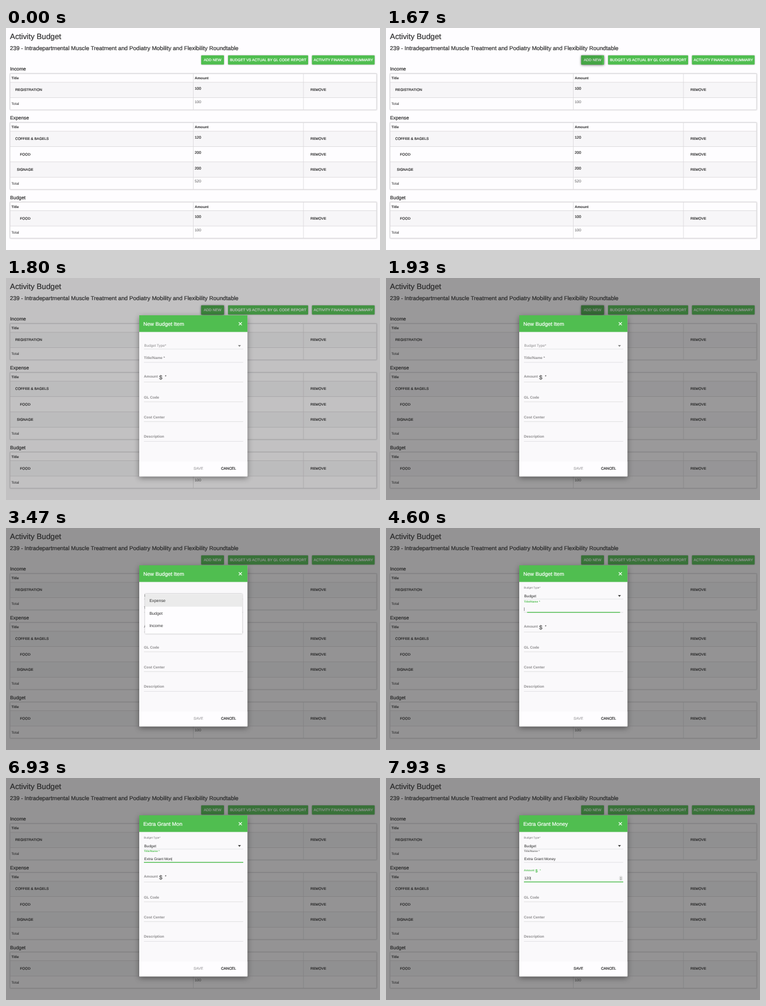
An HTML page that plays this animation: 640x381 px, repeating every 8000 ms.

```html
<!DOCTYPE html>
<html lang="en">
<head>
<meta charset="utf-8">
<title>Activity Budget</title>
<style>
  html, body { margin: 0; width: 100%; height: 100%; overflow: hidden; background: #fefdff; }
  svg { display: block; width: 640px; height: 381px; }
  text { font-family: "Liberation Sans", Arial, sans-serif; text-rendering: geometricPrecision; white-space: pre; }
  .bold { font-weight: bold; }
  .medium { stroke: currentColor; stroke-width: .2px; }
  .raised { filter: drop-shadow(0 .8px .8px rgba(0, 0, 0, .35)); }
  .pressed { filter: drop-shadow(0 1.5px 2px rgba(0, 0, 0, .45)); }
  .floating { filter: drop-shadow(0 3px 5px rgba(0, 0, 0, .4)); }
</style>
</head>
<body>
<svg viewBox="0 0 640 381"><g id="page"></g><g id="overlay"></g></svg>
<script>
const LOOP = 8000, GREEN = '#50be50', INK = '#2b2b2b', GREY = '#8c8b8d', LINE = '#d9d8da';
const TITLE = 'Extra Grant Money';

// Timeline in ms
const PRESS = 1600, OPEN = 1727, MENU_OPEN = 3130, HOVER = 3600, PICK = 3650,
  TITLE_FOCUS = 4400, TYPE_START = 5330, TYPE_STEP = 110, AMOUNT_FOCUS = 7300, DIGIT_START = 7600, DIGIT_STEP = 130;

const clamp = v => Math.min(1, Math.max(0, v));
const progress = (t, start, length) => clamp((t - start) / length);

// cubic-bezier(.25, .8, .25, 1)
function swift(x) {
  let lo = 0, hi = 1, u = .5;
  for (let i = 0; i < 20; i++) {
    u = (lo + hi) / 2;
    if (.75 * u * (1 - u) + u ** 3 < x) lo = u; else hi = u;
  }
  return 2.4 * u * (1 - u) ** 2 + 3 * u * u * (1 - u) + u ** 3;
}

const rect = (x, y, w, h, fill, extra = '') =>
  `<rect x="${x}" y="${y}" width="${w}" height="${h}" fill="${fill}" ${extra}/>`;
const text = (x, y, size, str, fill = INK, cls = 'medium', extra = '') =>
  `<text x="${x}" y="${y}" font-size="${size}" fill="${fill}" color="${fill}" class="${cls}" ${extra}>${str.replace('&', '&amp;')}</text>`;
const button = (x, w, label, cls = 'raised') =>
  rect(x, 47, w, 15.8, GREEN, `rx="1" class="${cls}"`) +
  text(x + w / 2, 57.2, 6.33, label, '#fff', 'medium', 'text-anchor="middle"');

function table(name, top, rows, total) {
  const head = 14.6, rowH = 26.35, totalH = 20.8;
  const height = head + rows.length * rowH + totalH;
  let y = top + head;
  let out = text(7, top - 5.4, 8.3, name) +
    rect(7, top, 627.3, height, '#fefdff', 'class="raised"') +
    text(9.3, top + 9.5, 6.25, 'Title', INK, 'bold') + text(323, top + 9.5, 6.25, 'Amount', INK, 'bold');
  rows.forEach(([label, x, amount], i) => {
    out += rect(7, y, 627, rowH, i % 2 ? '#fefdff' : '#f7f6f8') + rect(7, y - .4, 627, .8, LINE) +
      text(x, y + 15.3, 6.2, label) + text(323, y + 12.8, 6.5, amount) + text(521, y + 15.3, 6.2, 'REMOVE');
    y += rowH;
  });
  return out + rect(7, y - .4, 627, .8, LINE) +
    text(9.3, y + 12.7, 6.15, 'Total', INK, '') + text(323, y + 9.3, 6.5, total, '#555', '') +
    rect(320, top, .8, height, LINE) + rect(508.6, top, .8, height, LINE) +
    rect(7, top, 627, height, 'none', `stroke="${LINE}" stroke-width=".8"`);
}

function label(x, y, str, floated, active, cls = 'bold', icon = '') {
  const scale = 1 - .25 * floated;
  const color = active ? GREEN : floated > .5 ? '#777' : GREY;
  return `<g transform="translate(${x} ${y}) scale(${scale})">${text(0, 0, 6.3, str, color, cls)}${
    icon ? text(26, 2.2, 10, icon, active ? GREEN : '#555', 'medium') + text(36, 0, 6.3, '*', active ? GREEN : '#555', 'bold') : ''}</g>`;
}

function underline(y, focus = 0) {
  const w = 170 * focus;
  return rect(236, y - .4, 170, .8, '#dddcde') + (focus ? rect(321 - w / 2, y - .8, w, 1.4, GREEN) : '');
}

// Typed value with a caret that blinks while its field has the focus
function typed(id, x, y, value, showCaret) {
  const caret = showCaret ? `<tspan fill="#222" stroke="none" font-weight="normal" dx="-.5">|</tspan>` : '';
  return text(x, y, 6.4, value + caret, INK, '');
}

function menu(t) {
  const grow = swift(progress(t, MENU_OPEN, 200));
  const fade = 1 - progress(t, PICK, 70);
  if (t < MENU_OPEN || !fade) return '';
  const active = t < HOVER ? 0 : 1;
  return `<g opacity="${fade}" transform="translate(0 113) scale(1 ${grow})">` +
    rect(238, 0, 166.3, 68.5, '#fefdff', 'rx="1" class="raised"') +
    rect(238, .3 + active * 21.5, 166.3, 21.7, '#ebebeb') +
    ['Expense', 'Budget', 'Income'].map((s, i) => text(245.4, 14.2 + i * 21.5, 7.1, s, '#333', '')).join('') + '</g>';
}

function dialog(t) {
  const picked = t >= PICK, titleOn = t >= TITLE_FOCUS && t < AMOUNT_FOCUS, amountOn = t >= AMOUNT_FOCUS;
  const count = t < TYPE_START ? 0 : Math.floor((t - TYPE_START) / TYPE_STEP) + 1;
  const title = TITLE.slice(0, count);
  const digits = t < DIGIT_START ? '' : '120'.slice(0, Math.floor((t - DIGIT_START) / DIGIT_STEP) + 1);
  const typeUp = swift(progress(t, PICK, 400));
  const titleUp = swift(progress(t, TITLE_FOCUS, 400));
  const amountUp = swift(progress(t, AMOUNT_FOCUS, 400));
  const typing = (t >= TYPE_START && count <= TITLE.length) || digits;
  const blink = typing || (t - (amountOn ? AMOUNT_FOCUS : TITLE_FOCUS)) % 1000 < 500;
  const arrow = picked ? INK : '#777';

  let out = rect(228, 64, 185.2, 276.4, '#faf9fb', 'rx="1" class="floating"') +
    rect(228, 64, 185.2, 28.6, GREEN) + rect(228, 315, 185.2, 25.4, '#fefdff') +
    text(235, 81.6, 9.1, title || 'New Budget Item', '#fff', 'medium') +
    '<path d="M398.4 76l5.2 5.2m0-5.2l-5.2 5.2" stroke="#fff" stroke-width="1.1"/>';

  out += label(236.5 - .5 * typeUp, 118.4 - 14.2 * typeUp, 'Budget Type*', typeUp, picked && t < TITLE_FOCUS, '') +
    (picked ? text(236.5, 118.5, 6.5, 'Budget', INK, '') : '') +
    `<path d="M397 115.3h5l-2.5 2.6z" fill="${arrow}"/>` +
    underline(122, picked && t < TITLE_FOCUS ? 1 : 0);

  out += label(236, 138.6 - 11.2 * titleUp, 'Title/Name *', titleUp, titleOn) +
    typed('title', 236.5, 140.8, title, titleOn && blink) + underline(144.8, titleOn ? titleUp : 0);

  out += label(236, 171.5 - 11.4 * amountUp, 'Amount', amountUp, amountOn, 'bold', '$') +
    typed('amount', 236.5, 174.4, digits, amountOn && blink) + underline(178.5, amountOn ? amountUp : 0);
  if (amountOn) out += rect(399.8, 168.7, 4.2, 7, '#f4f4f4', 'rx="1.5" stroke="#bbb" stroke-width=".6"') +
    '<path d="M400.8 171.4l1.1-1.4 1.1 1.4zm0 1.6l1.1 1.4 1.1-1.4z" fill="#555"/>';

  ['GL Code', 'Cost Center', 'Description'].forEach((s, i) => {
    out += label(236, 206.6 + i * 33.9, s, 0, false) + underline(212.5 + i * 33.9);
  });
  return out + text(321, 328.5, 6.3, 'SAVE', digits ? INK : '#a9a8aa') +
    text(368, 328.5, 6.35, 'CANCEL', '#1d1d1d') + menu(t);
}

function press(t) {
  if (t < PRESS || t > 2800) return '';
  const grow = swift(progress(t, PRESS, 300));
  const fade = 1 - progress(t, 2100, 600);
  return button(334, 39, 'ADD NEW', t < 2100 ? 'pressed' : 'raised') +
    `<clipPath id="clip"><rect x="334" y="47" width="39" height="15.8" rx="1"/></clipPath>` +
    `<circle cx="350" cy="56" r="${30 * grow}" fill="#000" opacity="${.13 * fade}" clip-path="url(#clip)"/>`;
}

document.getElementById('page').innerHTML = rect(0, 0, 640, 381, '#fefdff') +
  text(6.8, 19, 13.25, 'Activity Budget') +
  text(6.8, 38.1, 9.8, '239 - Intradepartmental Muscle Treatment and Podiatry Mobility and Flexibility Roundtable') +
  button(334, 39, 'ADD NEW') + button(380, 137, 'BUDGET VS ACTUAL BY GL CODE REPORT') +
  button(523.6, 107.2, 'ACTIVITY FINANCIALS SUMMARY') +
  table('Income', 78.5, [['REGISTRATION', 15.8, '100']], '100') +
  table('Expense', 162.5, [['COFFEE & BAGELS', 15.8, '120'], ['FOOD', 24, '200'], ['SIGNAGE', 18.4, '200']], '520') +
  table('Budget', 299, [['FOOD', 24, '100']], '100');

const overlay = document.getElementById('overlay');
const begin = performance.now();

function render() {
  const t = (performance.now() - begin) % LOOP;
  const dim = .48 * swift(progress(t, OPEN, 400));
  overlay.innerHTML = press(t) +
    (t < OPEN ? '' : rect(0, 0, 640, 381, '#212121', `opacity="${dim}"`) + dialog(t));
  requestAnimationFrame(render);
}
render();
</script>
</body>
</html>
```
